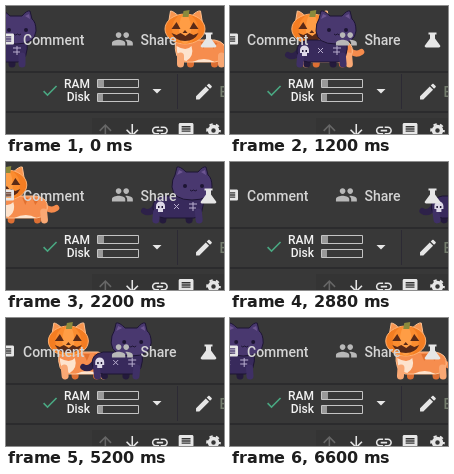
An HTML page that plays this animation: 218x128 px, repeating every 6.64 s.

```html
<!DOCTYPE html>
<html lang="en">
<head>
<meta charset="utf-8">
<title>Toolbar cats</title>
<style>
  html, body { margin: 0; width: 100%; height: 100%; overflow: hidden; background: #383838; }
  svg { display: block; width: 218px; height: 128px; }
  text { font: 500 14px Roboto, Arial, sans-serif; fill: #d4d4d4; }
  .small { font-size: 12px; fill: #f2f2f2; text-anchor: end; }
  .icon { fill: #e6e6e6; fill-rule: evenodd; }
  .bar { fill: none; stroke: #c4c4c4; }
  .leg { stroke-width: 7; stroke-linecap: round; }
</style>
</head>
<body>
<svg viewBox="0 0 218 128">
  <defs>
    <path id="note" d="M20 2H4c-1.1 0-2 .9-2 2v18l4-4h14c1.1 0 2-.9 2-2V4c0-1.1-.9-2-2-2zM18 14H6v-2h12zm0-3H6V9h12zm0-3H6V6h12z"/>
    <path id="arrow" d="M20 12l-1.41-1.41L13 16.17V4h-2v12.17l-5.58-5.59L4 12l8 8 8-8z"/>
  </defs>

  <rect width="218" height="128" fill="#383838"/>
  <path d="M0 66H218M0 106H218" stroke="#2b2b2d" stroke-width="2"/>
  <path d="M171.5 68V103" stroke="#2c2a34"/>
  <rect x="86" y="112" width="132" height="16" fill="#343434"/>

  <!-- Both cats are drawn facing left, centred on x = 0 -->
  <g id="pumpkin">
    <path d="M22 44Q28 50 34 46" fill="none" stroke="#f58b4c" stroke-width="6" stroke-linecap="round"/>
    <g class="leg" stroke="#dd6f33"><path d="M-10 50V58"/><path d="M14 50V58"/></g>
    <path d="M-25 34H14Q26 36 25 46Q24 55 14 56H-16Q-27 54 -25 34Z" fill="#f68d4e" stroke="#ffc08f"/>
    <path d="M-24 40Q-14 46 -9 40Q-6 50 -14 55Q-24 54 -24 40ZM-8 56Q4 50 14 56Z" fill="#fde3cd"/>
    <path d="M0 36l3 7 3-7M10 36l3 7 4-6" fill="#e2702f"/>
    <g class="leg" stroke="#f9a874"><path d="M-20 50V58"/><path d="M21 50V58"/></g>
    <path d="M-32 17L-30 5Q-27 5 -21 11M-10 11Q-3 4 0 5L2 17" fill="#f8954f" stroke="#ffc08f"/>
    <ellipse cx="-15.500" cy="23" rx="20" ry="15" fill="#f47d22" stroke="#ffb070"/>
    <ellipse cx="-15.500" cy="23" rx="13" ry="15" fill="#fb8c2f"/>
    <ellipse cx="-15.500" cy="23" rx="6" ry="15" fill="#ff9d45"/>
    <path d="M-18 11L-17 5L-11 4L-12 11Z" fill="#8a8a3c"/>
    <path d="M-29 23L-24 16L-20 23ZM-11 23L-7 16L-2 23ZM-18 27L-15.500 24L-13 27ZM-29 27L-24 29L-20 27L-15 30L-11 27L-7 29L-2 27Q-6 35 -15.500 35T-29 27Z" fill="#5a2a17"/>
  </g>

  <g id="skeleton">
    <path d="M22 44Q28 53 34 49" fill="none" stroke="#2d2149" stroke-width="6" stroke-linecap="round"/>
    <g class="leg" stroke="#241a3c"><path d="M-10 50V58"/><path d="M14 50V58"/></g>
    <path d="M-25 34H14Q26 36 25 46Q24 55 14 56H-16Q-27 54 -25 34Z" fill="#382a5c" stroke="#1d1533"/>
    <g class="leg" stroke="#3f3066"><path d="M-20 50V58"/><path d="M21 50V58"/></g>
    <path d="M-34 25Q-34 16 -30 13L-28 5Q-25 4 -20 10H-8Q-2 4 1 5L3 13Q6 17 6 25Q5 38 -14 38T-34 25Z" fill="#49386f" stroke="#1d1533"/>
    <path d="M-27 8L-28 13L-23 10ZM-1 8L1 13L-5 10Z" fill="#6c5591"/>
    <g fill="#1d1533"><circle cx="-24" cy="24" r="2"/><circle cx="-7" cy="24" r="2"/></g>
    <path d="M-19 28q2 2 3.500 0q2 2 3.500 0" fill="none" stroke="#1d1533"/>
    <path d="M13 44a4.500 4.500 0 0 1 9 0v3h-2v3h-5v-3h-2z" fill="#ded9e8"/>
    <path d="M-19 42h8M-18 46h7M-15 40v9M-1 42l5 5M4 42l-5 5" fill="none" stroke="#b9aecf"/>
    <path d="M15 45h1.500M18.500 45h1.500" stroke="#1d1533" stroke-width="2"/>
  </g>

  <g class="icon">
    <use href="#note" transform="translate(-7.400 26) scale(.7)"/>
    <path fill="#b8b8b8" transform="translate(105 21.500) scale(.95)" d="M16 11c1.660 0 2.990-1.340 2.990-3S17.660 5 16 5c-1.660 0-3 1.340-3 3s1.340 3 3 3zm-8 0c1.660 0 2.990-1.340 2.990-3S9.660 5 8 5C6.340 5 5 6.340 5 8s1.340 3 3 3zm0 2c-2.330 0-7 1.170-7 3.500V19h14v-2.500c0-2.330-4.670-3.500-7-3.500zm8 0c-.29 0-.62.02-.97.05 1.160.84 1.970 1.970 1.970 3.450V19h6v-2.500c0-2.330-4.670-3.500-7-3.500z"/>
    <path d="M198.500 26.500h8v2h-1.500v4l5.300 7.200q.4 1.800-1.500 1.800h-12.600q-1.900 0-1.500-1.800l5.300-7.200v-4h-1.500z"/>
    <path fill="#4aa882" transform="translate(34.300 75) scale(.8)" d="M9 16.170L4.830 12l-1.420 1.410L9 19 21 7l-1.410-1.410z"/>
    <path d="M146.500 83h9l-4.500 4.500z"/>
    <path transform="translate(187.400 75) scale(.88)" d="M3 17.250V21h3.750L17.810 9.940l-3.750-3.750zM20.710 7.040c.39-.39.39-1.020 0-1.410l-2.340-2.340c-.39-.39-1.020-.39-1.410 0l-1.830 1.830 3.750 3.750z"/>
    <use href="#arrow" fill="#666" transform="translate(90 133.700) scale(.78 -.78)"/>
    <use href="#arrow" transform="translate(116.900 115) scale(.78)"/>
    <path transform="translate(144.300 115) scale(.8)" d="M3.900 12c0-1.710 1.390-3.100 3.100-3.100h4V7H7c-2.760 0-5 2.240-5 5s2.240 5 5 5h4v-1.900H7c-1.710 0-3.100-1.390-3.100-3.100zM8 13h8v-2H8zm9-6h-4v1.900h4c1.710 0 3.100 1.390 3.100 3.100s-1.390 3.100-3.100 3.100h-4V17h4c2.760 0 5-2.240 5-5s-2.240-5-5-5z"/>
    <use href="#note" transform="translate(171.200 115.500) scale(.74)"/>
  </g>
  <g fill="none" stroke="#e6e6e6">
    <circle cx="207.500" cy="124.500" r="4" stroke-width="3.500"/>
    <circle cx="207.500" cy="124.500" r="6.300" stroke-width="2" stroke-dasharray="3.300" stroke-dashoffset="1.600"/>
  </g>

  <text x="17" y="39">Comment</text>
  <text x="134.500" y="39">Share</text>
  <text class="small" x="84" y="81.500">RAM</text>
  <text class="small" x="84" y="95">Disk</text>
  <text x="213.500" y="91" style="fill:#747d6e">Edit</text>
  <path d="M92 74h6v7h-6zM92 88h5v7h-5z" fill="#999"/>
  <path class="bar" d="M91.500 73.500h41v8h-41zM91.500 87.500h41v8h-41z"/>
</svg>

<script>
const LOOP = 6640, STEP = 40;
const pumpkin = document.getElementById("pumpkin");
const skeleton = document.getElementById("skeleton");

function pose(cat, x, flip, t) {
  cat.setAttribute("transform", `translate(${x} 0) scale(${flip} 1)`);
  cat.querySelectorAll(".leg path").forEach((leg, i) => {
    const swing = 8 * Math.sin(t / 80 + i * Math.PI);
    const hip = [-10, 14, -20, 21][i];
    leg.setAttribute("transform", `rotate(${swing} ${hip} 46)`);
  });
}

// The walk plays forwards, then backwards.
function draw(now) {
  const frameTime = Math.floor(now % LOOP / STEP) * STEP;
  const t = Math.min(frameTime, LOOP - frameTime);
  pose(pumpkin, 194.5 - .081 * t, 1, t);
  pose(skeleton, -4 + .08 * t, -1, t);
}

const start = performance.now();
function tick() {
  draw(performance.now() - start);
  requestAnimationFrame(tick);
}
tick();
</script>
</body>
</html>
```
